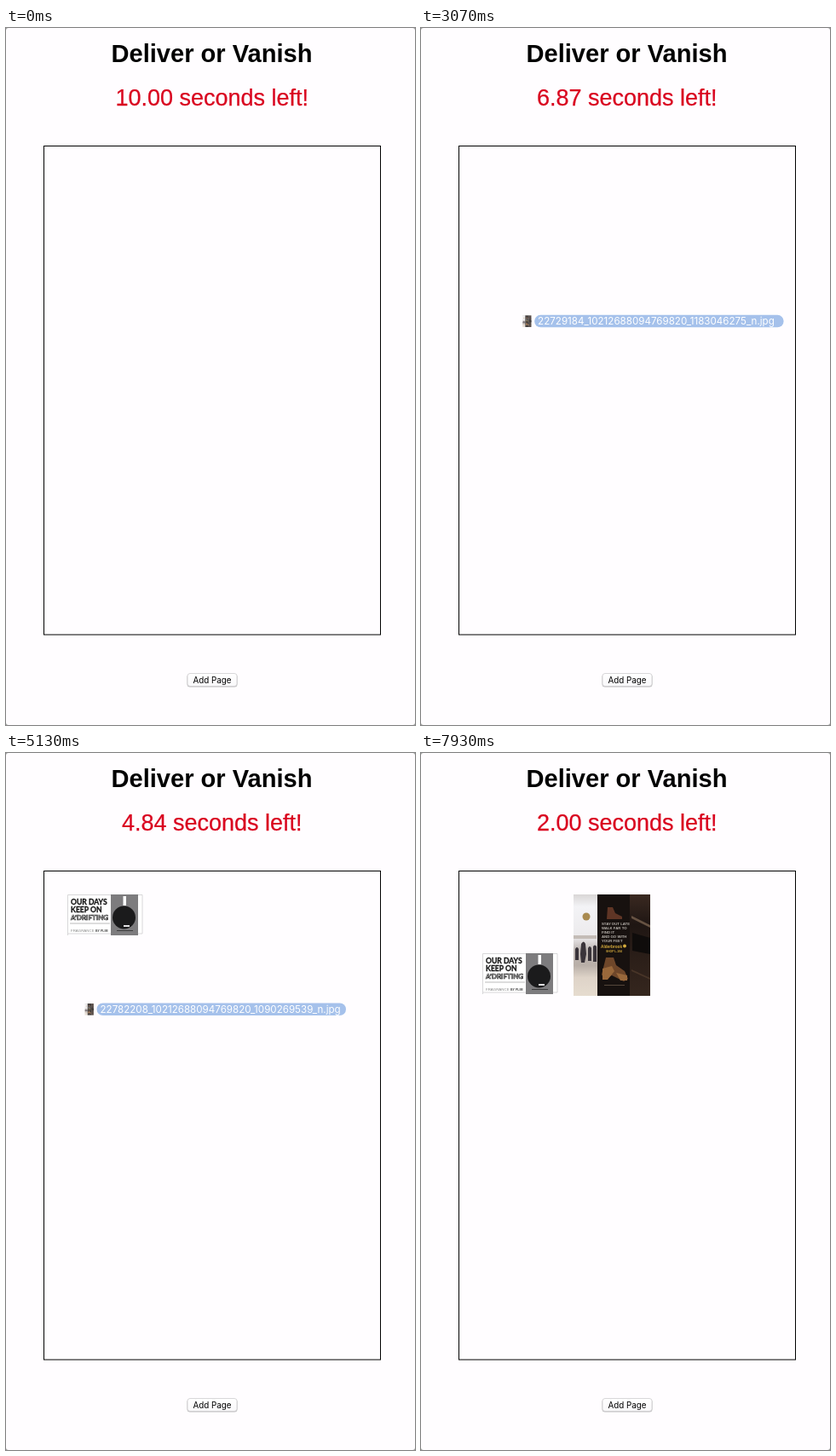
An HTML page for the animation above (8000 ms loop, 480 by 818 pixels).

```html
<!DOCTYPE html>
<html lang="en">
<head>
<meta charset="utf-8">
<title>Deliver or Vanish</title>
<style>
  html, body { margin: 0; width: 100%; height: 100%; overflow: hidden; background: #999; }
  svg { display: block; width: 480px; height: 818px; font-family: "Liberation Sans", Arial, sans-serif; }
  .mid { text-anchor: middle; }
  .ui { font-family: Inter, Roboto, sans-serif; }
</style>
</head>
<body>
<svg viewBox="0 0 480 818">
  <defs>
    <linearGradient id="shop" x2="0" y2="1">
      <stop offset="0" stop-color="#d9d6d6"/>
      <stop offset=".12" stop-color="#f3f3f6"/>
      <stop offset=".42" stop-color="#eceaec"/>
      <stop offset=".55" stop-color="#bdb5b2"/>
      <stop offset=".7" stop-color="#b9afa8"/>
      <stop offset=".82" stop-color="#ded3c8"/>
      <stop offset="1" stop-color="#e6dccf"/>
    </linearGradient>
    <linearGradient id="wall" x2="0" y2="1">
      <stop offset="0" stop-color="#3a2921"/>
      <stop offset=".3" stop-color="#1f1613"/>
      <stop offset=".65" stop-color="#2c1f19"/>
      <stop offset="1" stop-color="#35261e"/>
    </linearGradient>
    <linearGradient id="button" x2="0" y2="1">
      <stop offset="0" stop-color="#fff"/>
      <stop offset="1" stop-color="#f9f8fa"/>
    </linearGradient>
    <g id="photo">
      <path fill="url(#shop)" d="M0 0H29V119H0Z"/>
      <circle cx="15" cy="26" r="4.5" fill="#a98a50"/>
      <path fill="#c4bcb7" d="M0 48H27V52H0Z"/>
      <path fill="#3a343a" d="M9 58q3-5 5 0l1 12-2 10H9L8 70ZM17 63q2-4 4 0v15h-4ZM2 64q2-4 4 0v13H2ZM23 61q2-3 4 0v18h-4Z"/>
      <path fill="#17110f" d="M28 0H67V119H28Z"/>
      <path fill="url(#wall)" d="M66 0H90V119H66Z"/>
      <path fill="#665242" d="M68 25L90 36V39L68 28Z"/>
      <path fill="#483528" d="M68 88L90 98V100L68 90Z"/>
      <path fill="#0f0c0b" d="M69 45L90 51V70L69 66Z"/>
      <path fill="#5f3525" d="M40 15H46L49 22 57 26V29H39Z"/>
      <g fill="#b9b4ae" font-size="4.3" font-weight="700">
        <text x="33" y="36">STAY OUT LATE</text>
        <text x="33" y="41">WALK FAR TO</text>
        <text x="33" y="46">FIND IT</text>
        <text x="33" y="51">AND GO WITH</text>
        <text x="33" y="56">YOUR FEET</text>
      </g>
      <g fill="#d5ab3c" font-weight="700">
        <text x="32" y="62.5" font-size="4.7">Alderbrook</text>
        <circle cx="60" cy="60.5" r="2"/>
        <text x="38" y="67.5" font-size="3.3">SHOP L-104</text>
      </g>
      <path fill="#6f472a" d="M38 74H47L50 83 60 90 64 99 59 102 45 95 36 99 33 94Z"/>
      <path fill="#99683b" d="M34 87L45 84 48 90 40 100H34ZM50 92L63 95V101L55 101Z"/>
      <path fill="#55463a" d="M36 106H60V107H36Z"/>
    </g>
  </defs>

  <rect width="480" height="818" rx="3" fill="#fffdff"/>
  <text class="mid" x="241.5" y="40" font-size="29.1" font-weight="700">Deliver or Vanish</text>
  <text class="mid" id="timer" x="241.8" y="91" font-size="27" fill="#d9041f" stroke="#d9041f" stroke-width=".25"></text>
  <rect x="44.5" y="138.5" width="395" height="573.5" fill="none" stroke="#000"/>

  <rect x="212.5" y="758" width="59" height="15.5" rx="3.5" fill="#bbb9bc"/>
  <rect x="213" y="757.5" width="58" height="15" rx="3" fill="url(#button)" stroke="#cfcdd0" stroke-width=".8"/>
  <text class="mid ui" x="242" y="769" font-size="9.8">Add Page</text>

  <g id="advert">
    <path d="M72.5 214V166.5H160V212H72.5" fill="#fff" stroke="#cfcdd0" stroke-width=".8"/>
    <g font-weight="700" font-size="8.6" fill="#151515" stroke="#151515" stroke-width=".3" font-family="Lato, sans-serif">
      <text x="76" y="178">OUR DAYS</text>
      <text x="76" y="187">KEEP ON</text>
      <text x="76" y="195.5" font-size="8" fill="#fff" stroke="#333" stroke-width=".7">A’DRIFTING</text>
    </g>
    <path d="M75 200H122" stroke="#aaa" stroke-width=".8"/>
    <text x="76" y="209.5" font-size="4.4" fill="#888">FRAGRANCE</text>
    <text x="105" y="209.5" font-size="3.6" font-weight="700" fill="#444">BY PLIM</text>
    <path fill="#7d7c7e" d="M123 166H155V214H123Z"/>
    <path fill="#fff" d="M137.5 168H141V179H137.5Z"/>
    <circle cx="138.5" cy="193" r="13.5" fill="#1b1b1c"/>
    <path fill="#e4e3e5" d="M138 202H145V204H138Z"/>
    <path stroke="#3c3c3d" d="M130 208.5H149"/>
  </g>

  <use id="poster" href="#photo" x="179" y="166"/>

  <g id="drag">
    <use href="#photo" transform="translate(.5 .5) scale(.115)" opacity=".8"/>
    <rect x="14.5" y="0" width="292.5" height="14.5" rx="7.25" fill="#a5c1eb"/>
    <text class="ui" id="file" x="18.5" y="11.5" font-size="11.6" fill="#fff"></text>
  </g>
</svg>
<script>
const LOOP = 8000, FPS = 15;
const ADVERT_DROP = 3330, POSTER_DROP = 5400;

// Elapsed countdown seconds at chosen times (ms); linear in between.
const countdown = [[0, 0], [67, .13], [1200, 1.27], [2533, 2.6], [3733, 3.79], [5133, 5.16], [6000, 6.03], [7933, 8]];

const drags = [
  { start: 2930, settle: 3200, end: ADVERT_DROP, from: [145, 480], to: [110, 290],
    name: "22729184_10212688094769820_1183046275_n.jpg" },
  { start: 4800, settle: 5100, end: POSTER_DROP, from: [98, 470], to: [92, 293.5],
    name: "22782208_10212688094769820_1090269539_n.jpg" },
];

const el = id => document.getElementById(id);
const show = (id, on) => el(id).setAttribute("visibility", on ? "visible" : "hidden");
const mix = (a, b, p) => a + (b - a) * p;

function elapsed(t) {
  const i = countdown.findIndex(point => point[0] >= t);
  if (i <= 0) return 0;
  const [t0, s0] = countdown[i - 1], [t1, s1] = countdown[i];
  return mix(s0, s1, (t - t0) / (t1 - t0));
}

function draw(now) {
  // The small lead absorbs rounding at the step boundaries.
  const step = Math.floor((now % LOOP + 4) * FPS / 1000) % (LOOP * FPS / 1000);
  const t = Math.floor(step * 1000 / FPS);
  el("timer").textContent = (10 - elapsed(t)).toFixed(2) + " seconds left!";

  show("advert", t >= ADVERT_DROP);
  show("poster", t >= POSTER_DROP);
  el("advert").setAttribute("transform", `translate(0 ${t >= POSTER_DROP ? 69 : 0})`);

  const drag = drags.find(d => t >= d.start && t < d.end);
  show("drag", drag);
  if (drag) {
    const p = Math.min(1, (t - drag.start) / (drag.settle - drag.start));
    const ease = 1 - (1 - p) ** 2;
    const [x, y] = drag.from.map((v, i) => mix(v, drag.to[i], ease));
    el("drag").setAttribute("transform", `translate(${x} ${y})`);
    el("file").textContent = drag.name;
  }
}

function tick() {
  draw(performance.now());
  requestAnimationFrame(tick);
}
tick();
</script>
</body>
</html>
```
